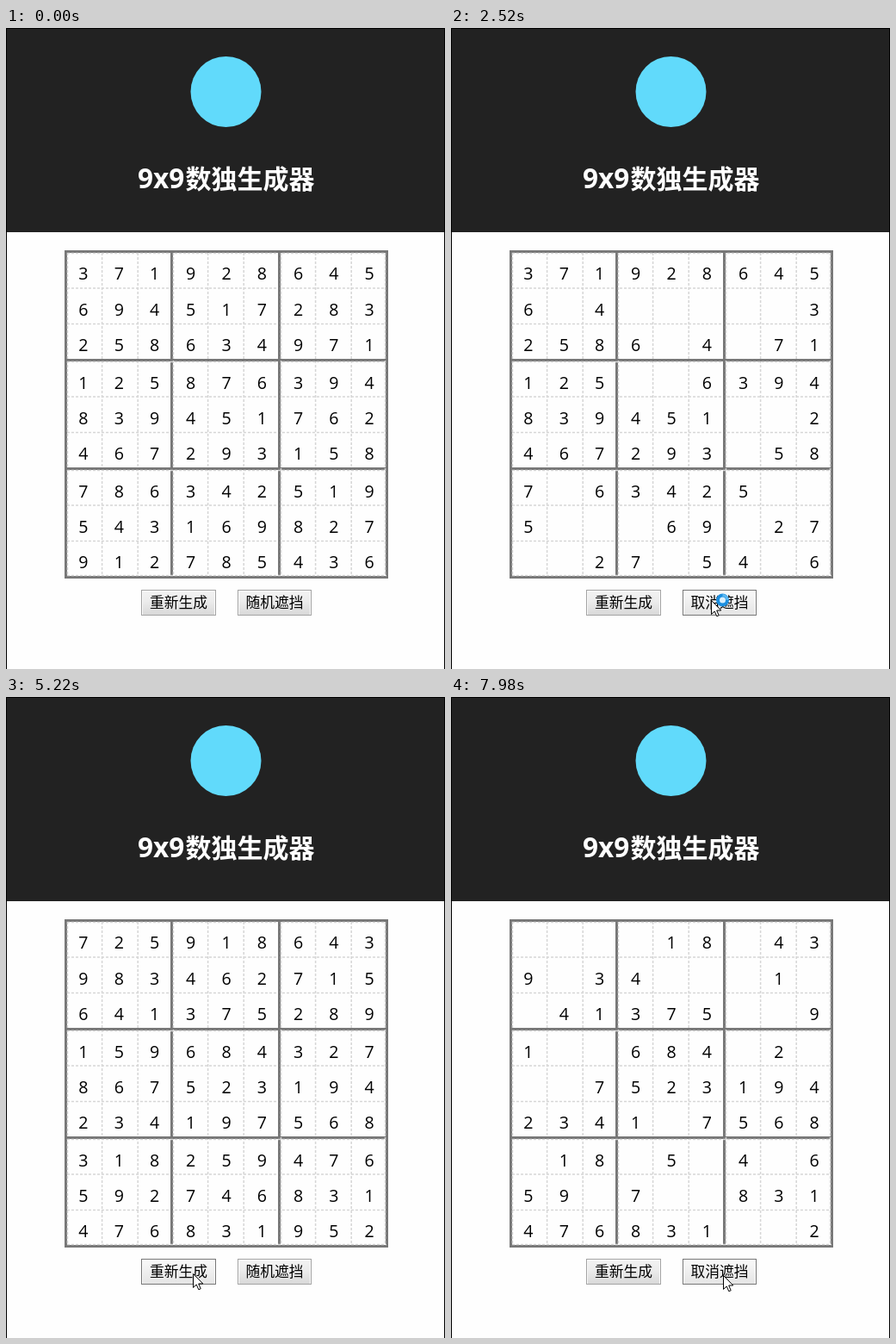
Recreate the animation shown at these times as an HTML page. Size 510x744 px, loop 8000 ms.

```html
<!DOCTYPE html>
<html lang="zh-CN">
<head>
<meta charset="utf-8">
<title>9x9数独生成器</title>
<style>
  html, body { margin: 0; width: 100%; height: 100%; overflow: hidden; background: #fefefe; }
  svg { display: block; width: 510px; height: 744px; }
  text { font-family: "Open Sans", "Noto Sans CJK SC", "Noto Sans CJK", sans-serif; }
  .title { font-weight: 700; font-size: 30px; fill: #fff; }
  .title.latin { font-size: 31.5px; }
  .digit { font-size: 19.6px; text-anchor: middle; }
  .label { font-size: 16.8px; text-anchor: middle; }
  .thin { stroke: #d6d6d6; stroke-width: 1.5; stroke-dasharray: 3 2; }
  .thick { stroke: #777; stroke-width: 3; }
  .button rect { fill: url(#face); stroke: #a3a3a3; }
  .button.hover rect { fill: url(#lit); stroke: #777; }
</style>
</head>
<body>
<svg viewBox="0 0 510 744">
  <defs>
    <linearGradient id="face" x2="0" y2="1">
      <stop offset="0" stop-color="#f3f3f3"/>
      <stop offset=".45" stop-color="#ececec"/>
      <stop offset="1" stop-color="#d8d8d8"/>
    </linearGradient>
    <linearGradient id="lit" x2="0" y2="1">
      <stop offset="0" stop-color="#fafafa"/>
      <stop offset="1" stop-color="#e4e4e4"/>
    </linearGradient>
  </defs>
  <rect width="510" height="744" fill="#fefefe"/>
  <rect width="510" height="237" fill="#222"/>
  <path d="M.5 744V.5H509.5V744" fill="none" stroke="#000"/>
  <circle cx="255.5" cy="74" r="41" fill="#61dafb"/>
  <text class="title latin" x="153" y="186">9x9</text>
  <text class="title" x="208.5" y="186">数独生成器</text>
  <g id="board"></g>
  <g id="buttons"></g>
  <g id="cursor">
    <path d="M.5.5V16.5L4.2 13 6.8 18.8 9.2 17.8 6.7 12H11.8Z" fill="#fff" stroke="#000"/>
    <g id="busy">
      <circle cx="13.5" r="5.5" fill="#d9effc" stroke="#1c8fe0" stroke-width="4"/>
      <path d="M13.5-5.5A5.5 5.5 0 0 1 19 0" fill="none" stroke="#5cb8f2" stroke-width="3"/>
    </g>
  </g>
</svg>
<script>
const LOOP = 8000, STEP = 60;
const $ = id => document.getElementById(id);
const row = i => Math.floor(i / 9), col = i => i % 9;
const third = n => Math.floor(n / 3);

// Each puzzle has one solution, so its clues describe the whole board.
const first = makePuzzle("371928645 6.4.....3 2586.4.71 125..6394 839451..2 467293.58 7.63425.. 5...69.27 ..27.54.6");
const second = makePuzzle(".91.2.... 6.35.7... 47.86.... .8.....16 9.7...38. 53....7.4 ....92.53 ...1.48.2 ...37.64.");
const third_ = makePuzzle("....18.43 9.34...1. .41375..9 1..684.2. ..7523194 2341.7568 .18.5.4.6 59.7..831 476831..2");

const scenes = [
  { at: 0, digits: first.solved },
  { at: 1320, digits: first.clues, masked: true },
  { at: 2640, digits: first.solved },
  { at: 3660, digits: second.solved },
  { at: 4680, digits: third_.solved },
  { at: 6420, digits: third_.clues, masked: true }
];

// Pointer tip: each move ends at (x, y)
const ENTER = { x: 483, y: 318 };
const moves = [
  { from: 60, to: 480, x: 222, y: 622 },
  { from: 480, to: 600, x: 204, y: 663 },
  { from: 600, to: 900, x: 268, y: 664 },
  { from: 900, to: 1140, x: 302, y: 664 },
  { from: 2700, to: 3240, x: 204, y: 667 },
  { from: 5160, to: 5460, x: 270, y: 677 },
  { from: 5460, to: 5820, x: 316, y: 671 }
];

function makePuzzle(text) {
  const clues = [...text.replaceAll(" ", "")];
  const solved = [...clues];
  solve(solved);
  return { clues, solved };
}

function sharesUnit(a, b) {
  return row(a) === row(b) || col(a) === col(b) ||
    third(row(a)) === third(row(b)) && third(col(a)) === third(col(b));
}

function options(digits, cell) {
  const used = new Set(digits.filter((_, i) => sharesUnit(i, cell)));
  return [..."123456789"].filter(d => !used.has(d));
}

// Fills the most constrained cell first and backtracks on dead ends.
function solve(digits) {
  let best = null;
  digits.forEach((digit, cell) => {
    if (digit !== ".") return;
    const choices = options(digits, cell);
    if (!best || choices.length < best.choices.length) best = { cell, choices };
  });
  if (!best) return true;
  for (const digit of best.choices) {
    digits[best.cell] = digit;
    if (solve(digits)) return true;
  }
  digits[best.cell] = ".";
  return false;
}

function add(parent, name, attrs, text = "") {
  const node = document.createElementNS("http://www.w3.org/2000/svg", name);
  for (const key in attrs) node.setAttribute(key, attrs[key]);
  node.textContent = text;
  return parent.appendChild(node);
}

const board = $("board");
const vertical = (cls, x, y1, y2) => add(board, "line", { class: cls, x1: x, y1, x2: x, y2 });
const horizontal = (cls, y, x1, x2) => add(board, "line", { class: cls, x1, y1: y, x2, y2: y });

const blockX = [69.5, 192.5, 317.5, 442.5];
const blockY = blockX.map((_, i) => 259.5 + i * 126);
for (let block = 0; block < 3; block++) {
  for (const k of [1, 2]) {
    vertical("thin", blockX[block] + k * 41.6 + .5, 261, 636);
    horizontal("thin", blockY[block] + k * 41.5 + 1, 71, 442);
  }
}
blockX.forEach((x, i) => {
  const y = blockY[i], inset = i === 3 ? -2 : 2;
  vertical("thick", x, 258, 639);
  horizontal("thick", y, 68, 444);
  vertical("thin", x + inset, 261, 636);
  horizontal("thin", y + inset, 71, 442);
});

const columnX = c => 89.9 + c * 41.35 + third(c) * .75;
const rowY = r => Math.round(292.3 + third(r) * 126.3 + r % 3 * 41.25);
const cells = Array.from({ length: 81 }, (_, i) =>
  add(board, "text", { class: "digit", x: columnX(col(i)), y: rowY(row(i)) }));

function makeButton(x, width, text) {
  const group = add($("buttons"), "g", { class: "button" });
  add(group, "rect", { x: x + .5, y: 652.5, width: width - 1, height: 29 });
  add(group, "path", { d: `M${x + 1.5} 681V653.5H${x + width - 1.5}V681`, fill: "none", stroke: "#fbfbfb" });
  const label = add(group, "text", { class: "label", x: x + width / 2, y: 673 }, text);
  return { x, width, group, label };
}
const buttons = [makeButton(157, 87, "重新生成"), makeButton(269, 86, "随机遮挡")];

function pointerAt(t) {
  let { x, y } = ENTER;
  for (const move of moves) {
    const k = Math.min(1, Math.max(0, (t - move.from) / (move.to - move.from)));
    x += (move.x - x) * k;
    y += (move.y - y) * k;
  }
  return [Math.round(x), Math.round(y)];
}

let shown;
function showScene(scene) {
  if (scene === shown) return;
  shown = scene;
  cells.forEach((cell, i) => { cell.textContent = scene.digits[i].replace(".", ""); });
  buttons[1].label.textContent = scene.masked ? "取消遮挡" : "随机遮挡";
}

function render(now) {
  const t = Math.floor(now % LOOP / STEP) * STEP;
  showScene(scenes.filter(s => s.at <= t).pop());

  const visible = t >= moves[0].from;
  const [x, y] = pointerAt(t);
  const busy = t >= 2400 && t < 2640 || t >= 3480 && t < 3660;
  $("cursor").style.display = visible ? "" : "none";
  $("cursor").setAttribute("transform", `translate(${x} ${y})`);
  $("busy").style.display = busy ? "" : "none";
  for (const b of buttons) {
    const over = y >= 652 && y < 682 && x >= b.x && x < b.x + b.width;
    b.group.classList.toggle("hover", over);
  }
}

const start = performance.now();
function tick() {
  render(performance.now() - start);
  requestAnimationFrame(tick);
}
tick();
</script>
</body>
</html>
```
